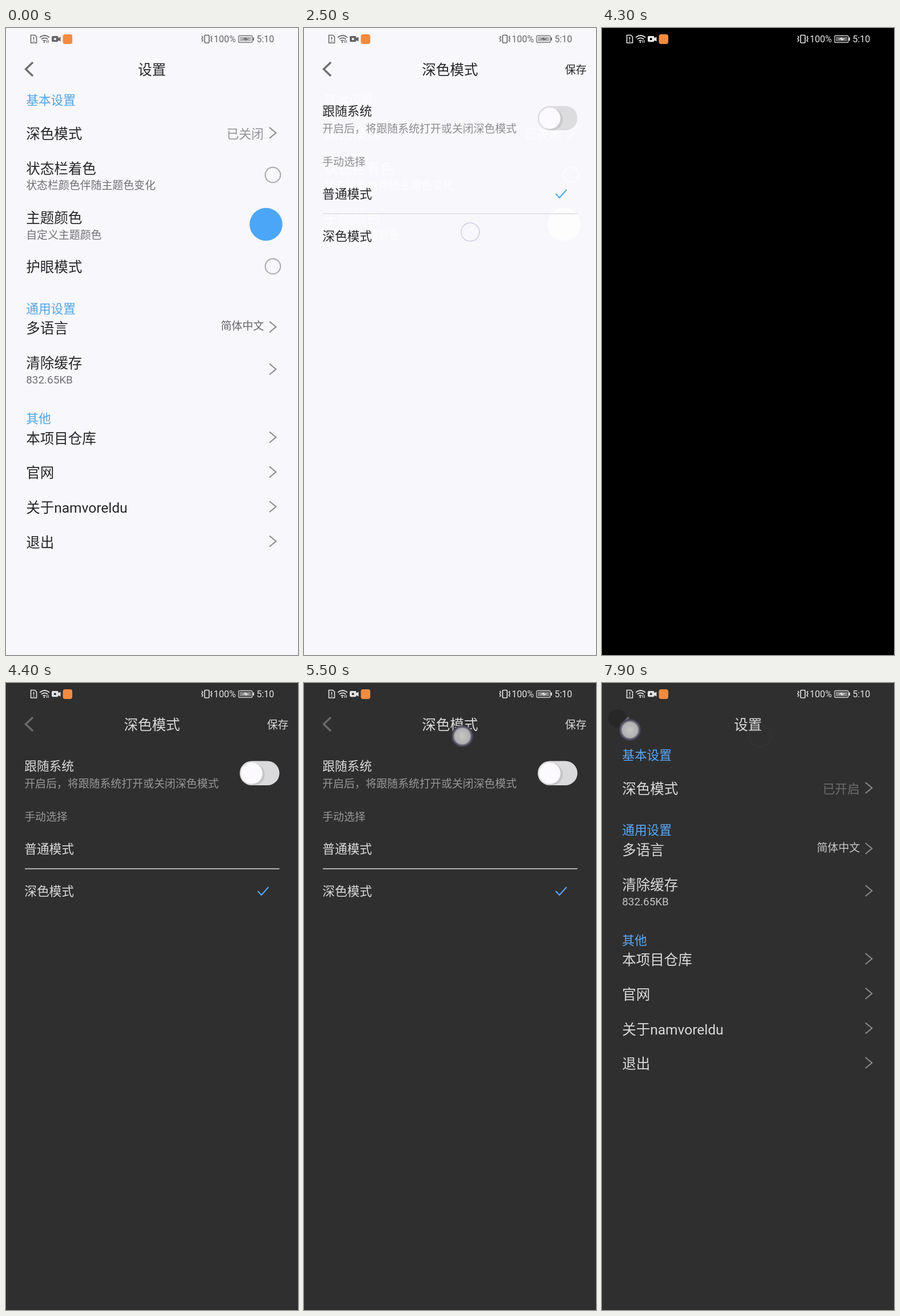
An HTML page for the animation above (8000 ms loop, 511 by 1097 pixels).

```html
<!DOCTYPE html>
<html lang="zh-CN">
<head>
<meta charset="utf-8">
<title>设置</title>
<style>
html, body { margin: 0; width: 100%; height: 100%; overflow: hidden; background: #f8f7fb }
svg { display: block; width: 100vw; height: 100vh; font-family: Roboto, "Noto Sans CJK SC", "Noto Sans CJK", sans-serif }
.light { --bg: #f8f7fb; --bar: #666; --ink: #262628; --sub: #707074; --state: #929296; --note: #8e8e92; --value: #66666a;
  --accent: #50a5e4; --disc: #4ca6f7; --radio: #a8a8aa; --arrow: #88888a; --back: #6e6e70; --rule: #dddce0; --track: #dcdbde }
.dark { --bg: #2f2f2f; --bar: #e4e4e4; --ink: #dadada; --sub: #c2c2c2; --state: #6c6c6c; --note: #979797; --value: #c8c8c8;
  --accent: #5aa8f8; --arrow: #8c8c8c; --back: #6a6a6a; --rule: #d8d8d8; --track: #dadadc }
.black { --bg: #000; --bar: #e8e8e8 }
.pale { --ink: #fff; --sub: #fff; --state: #fff; --value: #fff; --accent: #fff; --disc: #fff; --radio: #fff; --arrow: #fff }
</style>
</head>
<body>
<svg id="stage" viewBox="0 0 511 1097"></svg>
<script>
const stage = document.getElementById('stage');
const SMALL = 18.9, MEDIUM = 21.7, LARGE = 24.5;

// y is the vertical middle of the glyphs
const text = (x, y, s, size = LARGE, color = 'ink', anchor = 'start') =>
  `<text x="${x}" y="${y + size * .375}" font-size="${size}" fill="var(--${color})" text-anchor="${anchor}">${s}</text>`;
const line = (d, color, width = 2) =>
  `<path d="${d}" fill="none" stroke="var(--${color})" stroke-width="${width}"/>`;
const arrow = y => line(`M461 ${y - 9.5}l11.5 9.5l-11.5 9.5`, 'arrow');
const radio = y => `<circle cx="467" cy="${y}" r="13.3" fill="none" stroke="var(--radio)" stroke-width="2"/>`;
const check = (y, id = '') => `<g id="${id}">${line(`M440.5 ${y}l6.5 7l12.5 -14`, 'accent')}</g>`;
const header = title => text(255.5, 73, title, LARGE, 'ink', 'middle') + line('M47 60l-12.5 12l12.5 12', 'back', 3.4);

const statusBar = () => `
  ${line('M43.5 12.5h7l3 3v10.5h-10zM48.5 15.5v5M48.5 22v2', 'bar', 1.6)}
  ${line('M59 16.5q8.5 -7 17 0M61.8 19.6q5.7 -4.4 11.4 0M64.5 22.6q2.5 -2 5 0', 'bar', 1.7)}
  <circle cx="67" cy="24.7" r="1.3" fill="var(--bar)"/>
  ${line('M71.5 21v5M74.2 21v5', 'bar', 1.1)}
  <path d="M82 14h7.500q2 0 2 2v1.500l4 -2v8l-4 -2v.8q0 2 -2 2h-7.500q-2 0 -2 -2v-6.300q0 -2 2 -2z" fill="var(--bar)"/>
  <circle cx="85.700" cy="19.200" r="2" fill="var(--bg)"/>
  <rect x="99.500" y="11" width="16.500" height="17" rx="4" fill="#f28b40"/>
  <rect x="347.500" y="12.500" width="8" height="13.500" rx="1.500" fill="none" stroke="var(--bar)" stroke-width="1.700"/>
  ${line('M342.500 14l1.800 2l-1.800 2.700l1.800 2.700l-1.800 2.600M360.500 14l-1.800 2l1.800 2.700l-1.800 2.700l1.800 2.600', 'bar', 1.5)}
  ${text(363.5, 19.3, '100%', 16, 'bar')}
  <rect x="407" y="13.300" width="24" height="12" rx="2" fill="none" stroke="var(--bar)" stroke-width="1.200"/>
  <rect x="409" y="15.300" width="20" height="8" fill="var(--bar)" opacity=".45"/>
  <path d="M413 20l7 -3.500v2h6l-7 3.500v-2z" fill="var(--bar)"/>
  <rect x="432" y="16.300" width="2" height="6" rx="1" fill="var(--bar)"/>
  ${text(438.5, 19.3, '5:10', 16, 'bar')}`;

const appearance = () => `
  ${text(35.2, 245.5, '状态栏着色')}${text(35.2, 275, '状态栏颜色伴随主题色变化', SMALL, 'sub')}${radio(257)}
  ${text(35.2, 332, '主题颜色')}${text(35.2, 361.5, '自定义主题颜色', SMALL, 'sub')}
  <circle cx="455" cy="343.500" r="28.700" fill="var(--disc)"/>
  ${text(35.2, 418, '护眼模式')}${radio(417)}`;

const settings = dark => `
  ${header('设置')}
  ${text(35.2, 126, '基本设置', MEDIUM, 'accent')}
  ${text(35.2, 185, '深色模式')}
  ${text(451, 184.5, dark ? '已开启' : '已关闭', MEDIUM, 'state', 'end')}${arrow(183.5)}
  ${dark ? '' : appearance()}
  <g transform="translate(0 ${dark ? -233.5 : 0})">
    ${text(35.2, 490.5, '通用设置', MEDIUM, 'accent')}
    ${text(35.2, 525, '多语言')}${text(451.5, 521, '简体中文', SMALL, 'value', 'end')}${arrow(523)}
    ${text(35.2, 586, '清除缓存')}${text(35.2, 615, '832.65KB', SMALL, 'sub')}${arrow(597)}
    ${text(35.2, 683, '其他', MEDIUM, 'accent')}
    ${['本项目仓库', '官网', '关于namvoreldu', '退出'].map((s, i) =>
      text(35.2, 717.5 + i * 60.7, s) + arrow(716 + i * 60.7)).join('')}
  </g>`;

const modeChoice = () => `
  ${header('深色模式')}${text(494.5, 73, '保存', SMALL, 'ink', 'end')}
  ${text(32.2, 145, '跟随系统', MEDIUM)}
  ${text(32.2, 175.5, '开启后，将跟随系统打开或关闭深色模式', SMALL, 'note')}
  <rect x="409" y="136.500" width="69.500" height="42.500" rx="21.250" fill="var(--track)"/>
  <circle cx="434" cy="160" r="19" fill="#000" opacity=".09"/>
  <circle cx="430" cy="158" r="18.700" fill="#fcfafe"/>
  ${text(32.2, 234, '手动选择', SMALL, 'note')}
  ${text(32.2, 290, '普通模式', MEDIUM)}
  ${line('M33 325h445.500', 'rule', 1.4)}
  ${text(32.2, 364, '深色模式', MEDIUM)}`;

const scene = (id, theme, body) => `<g id="${id}" class="${theme}">
  <rect width="511" height="1097" fill="var(--bg)"/>${statusBar()}${body}</g>`;

stage.innerHTML = `
  <defs>
    <clipPath id="upper"><rect y="112" width="511" height="266"/></clipPath>
    <radialGradient id="press-light">
      <stop offset="0" stop-color="#f1f0f5"/><stop offset=".7" stop-color="#dedce4"/>
      <stop offset=".8" stop-color="#bdb6d0"/><stop offset="1" stop-color="#d8d4e6" stop-opacity="0"/>
    </radialGradient>
    <radialGradient id="press-dark">
      <stop offset="0" stop-color="#c6c6c6"/><stop offset=".68" stop-color="#b0b0b0"/>
      <stop offset=".78" stop-color="#686574"/><stop offset=".9" stop-color="#474459"/>
      <stop offset="1" stop-color="#3a3846" stop-opacity="0"/>
    </radialGradient>
  </defs>
  ${scene('settingsLight', 'light', settings(false))}
  ${scene('modeLight', 'light', `
    <g class="pale" clip-path="url(#upper)" opacity=".8">${settings(false)}</g>
    <g class="pale">${check(290)}</g>
    ${modeChoice()}${check(290, 'checkNormal')}${check(364, 'checkDark')}`)}
  ${scene('blank', 'black', '')}
  ${scene('modeDark', 'dark', modeChoice() + check(364))}
  ${scene('settingsDark', 'dark', `
    <circle cx="27" cy="62" r="16" fill="#272727"/>
    <circle cx="276.500" cy="93" r="19" fill="none" stroke="#383838"/>
    ${settings(true)}`)}
  <g id="touch"><circle id="disc" r="20"/><circle id="ring" r="16" fill="none" stroke-width="1.500"/></g>`;

const el = Object.fromEntries([...stage.querySelectorAll('[id]')].map(e => [e.id, e]));

// scene, time it is fully shown, whether it blends in one step earlier
const cuts = [
  ['settingsLight', 0, false], ['modeLight', 1700, true], ['blank', 4300, false],
  ['modeDark', 4400, false], ['settingsDark', 6300, true]
];
// start, end, x, y
const touches = [
  [1400, 1700, 145.5, 175.5], [2500, 2800, 291, 357], [3400, 3700, 476, 72],
  [5100, 5700, 277, 93], [5700, 6100, 27, 62], [7800, 8100, 49, 82]
];

function draw(t) {
  cuts.forEach(([id, at, blend], i) => {
    const next = cuts[i + 1];
    const opacity = t >= at ? 1 : blend && t >= at - 100 ? .5 : 0;
    el[id].style.display = opacity && !(next && t >= next[1]) ? '' : 'none';
    el[id].style.opacity = opacity;
  });
  el.checkNormal.style.display = t < 2700 ? '' : 'none';
  el.checkDark.style.display = t < 2700 ? 'none' : '';

  const touch = touches.find(([start, end]) => t >= start && t < end);
  el.touch.style.display = touch ? '' : 'none';
  if (!touch) return;
  const [start, end, x, y] = touch, dark = t >= 4400;
  const appearing = t < start + 100, leaving = t >= end - 100;
  el.touch.setAttribute('transform', `translate(${x} ${y})`);
  el.disc.setAttribute('fill', `url(#press-${dark ? 'dark' : 'light'})`);
  el.disc.style.opacity = appearing ? 0 : leaving ? .4 : 1;
  el.ring.setAttribute('stroke', dark ? '#57546a' : '#d2cbe6');
  el.ring.style.opacity = appearing ? 1 : 0;
}

const begin = performance.now();
function tick() {
  draw((performance.now() - begin) % 8000);
  requestAnimationFrame(tick);
}
tick();
</script>
</body>
</html>
```
